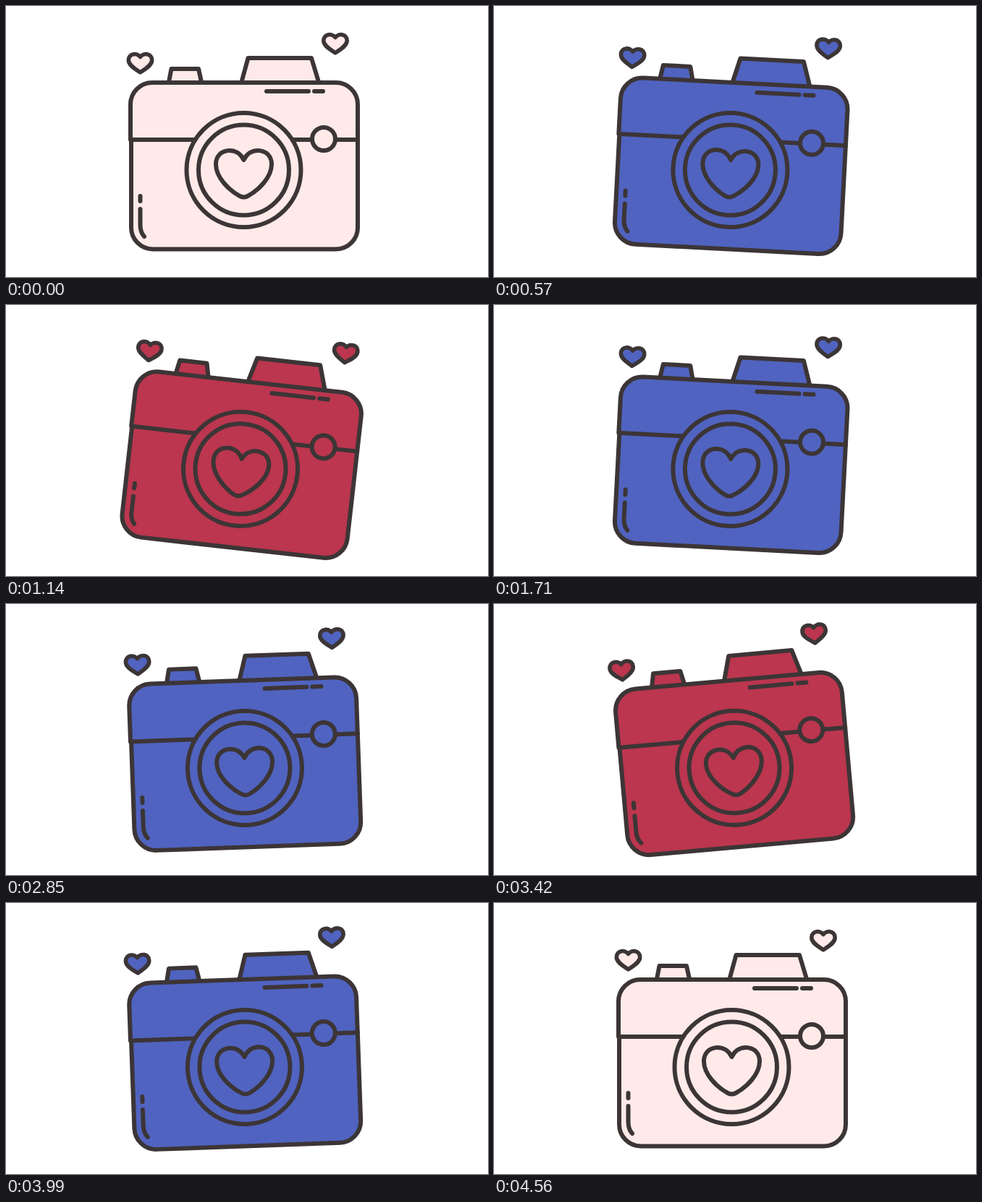
Animation of 666x375 px, one loop 5.13 s. Source, as an HTML page:

```html
<!DOCTYPE html>
<html lang="en">
<head>
<meta charset="utf-8">
<title>Wobbling camera</title>
<style>
  html, body { margin: 0; width: 100%; height: 100%; overflow: hidden; background: #fff; }
  svg { display: block; width: 666px; height: 375px; }
  #camera { stroke: #3c3536; stroke-width: 6; stroke-linecap: round; stroke-linejoin: round; }
</style>
</head>
<body>
<svg viewBox="0 0 666 375">
  <defs>
    <path id="heart" stroke-width="5.6" d="M0-8.5C-4-14.5-16.2-14-16.2-4C-16.2 3-7 8 0 12.8C7 8 16.2 3 16.2-4C16.2-14 4-14.5 0-8.5Z"/>
  </defs>
  <g id="camera">
    <use href="#heart" x="185.5" y="79"/>
    <use href="#heart" x="455" y="52"/>
    <path d="M225 105L228.5 87H266L270 105"/>
    <path d="M325.5 105L334.5 72H422L432 105"/>
    <!-- body and seam -->
    <path d="M202 106H456A30 30 0 0 1 486 136V306.500A30 30 0 0 1 456 336.500H203A30 30 0 0 1 173 306.500V185H172V136A30 30 0 0 1 202 106Z"/>
    <path d="M173 185H486"/>
    <!-- highlights -->
    <path fill="none" d="M360 118H418M426 118H438M185.500 263V270M185.500 281V303Q185.500 313 191 319"/>
    <circle cx="439" cy="184" r="16"/>
    <!-- lens -->
    <circle cx="328.500" cy="227" r="79"/>
    <circle cx="328.500" cy="227" r="62.500"/>
    <path d="M328.500 213C324 203.500 316 200 309 200C297 200 290 208.500 290 219C290 237 308 255 323 263Q328.500 266 334 263C349 255 367 237 367 219C367 208.500 360 200 348 200C341 200 333 203.500 328.500 213Z"/>
  </g>
</svg>
<script>
  const STEP = 570;
  const PINK = '#ffeae9', BLUE = '#5063c0', RED = '#bb364e';
  const angles = [0, 3, 6.4, 3, 0, -2.05, -5.1, -2.05, 0];
  const colors = [PINK, BLUE, RED, BLUE];
  const camera = document.getElementById('camera');

  function draw(now) {
    const step = Math.floor(now / STEP) % angles.length;
    camera.setAttribute('transform', `rotate(${angles[step]} 328 187)`);
    camera.setAttribute('fill', colors[step % colors.length]);
  }

  function tick() {
    draw(performance.now());
    requestAnimationFrame(tick);
  }
  tick();
</script>
</body>
</html>
```
